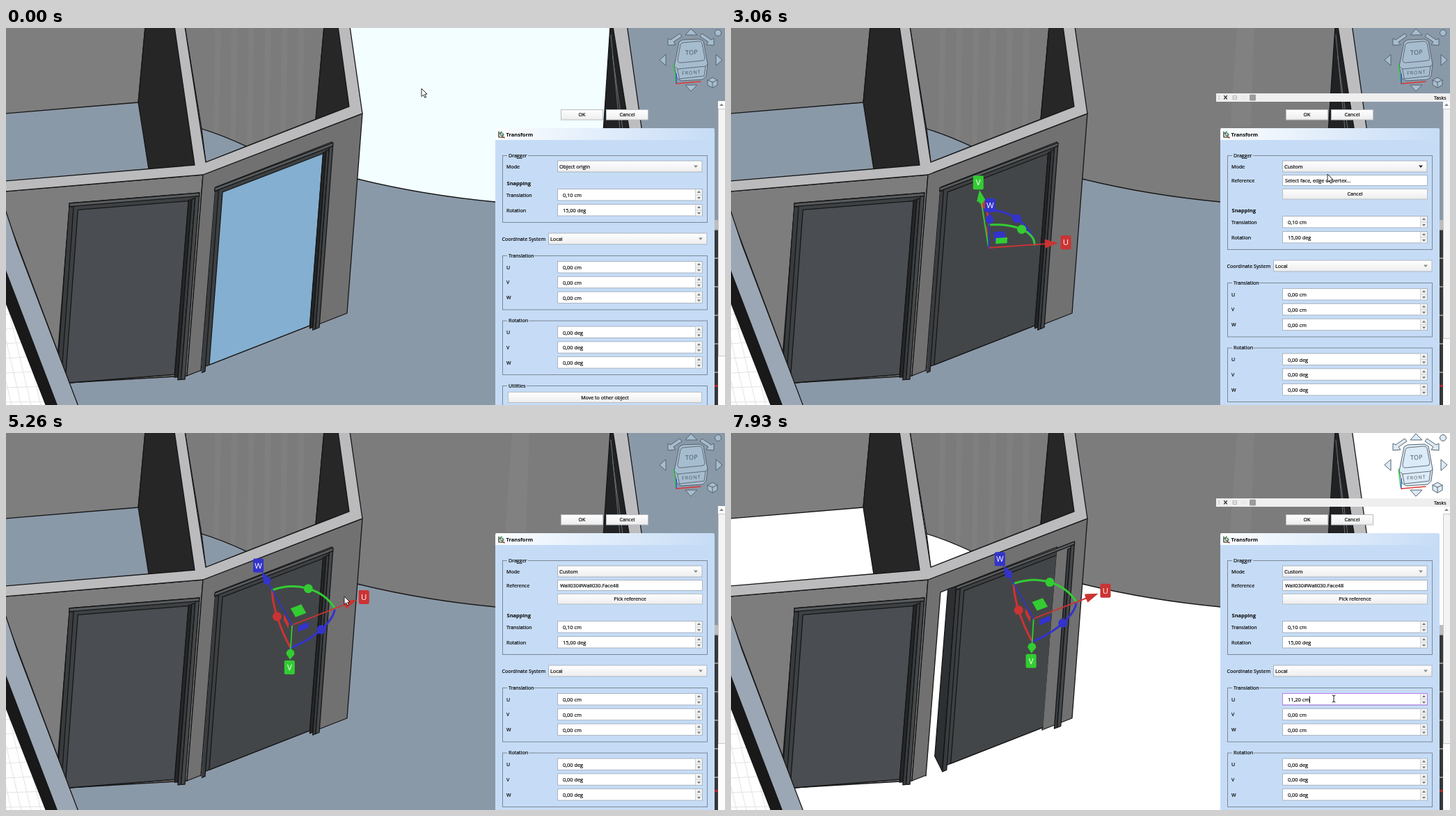
Recreate the animation shown at these times as an HTML page. Size 1033 by 542 pixels, loop 8 s.

```html
<!DOCTYPE html>
<html lang="en">
<head>
<meta charset="utf-8">
<title>Transform dragger</title>
<style>
html, body { margin: 0; width: 100%; height: 100%; overflow: hidden; background: #fff; }
svg { display: block; width: 1033px; height: 542px; }
text { font-family: "Open Sans", "Noto Sans", sans-serif; fill: #000; white-space: pre; }
.ui { stroke: #000; stroke-width: .18; }
.edge { stroke: #161616; stroke-width: 1.3; stroke-linejoin: round; stroke-linecap: round; }
</style>
</head>
<body>
<svg id="stage" viewBox="0 0 1033 542" xmlns="http://www.w3.org/2000/svg"></svg>
<script>
const LOOP = 8000;
const stage = document.getElementById('stage');

// ---- drawing helpers ----
const poly = (pts, fill, more = 'class="edge"') => `<polygon points="${pts}" fill="${fill}" ${more}/>`;
const flat = (pts, fill) => poly(pts, fill, '');
const path = (d, color, w = 1.3) => `<path d="${d}" fill="none" stroke="${color}" stroke-width="${w}" stroke-linecap="round"/>`;
const edge = d => path(d, '#161616');
const rect = (x, y, w, h, fill, more = '') =>
  `<rect x="${x}" y="${y}" width="${w}" height="${h}" fill="${fill}" ${more}/>`;
const dot = ([x, y], fill, r = 6.5) => `<circle cx="${x}" cy="${y}" r="${r}" fill="${fill}"/>`;
const text = (x, y, s, size = 7.1, more = 'class="ui"') =>
  `<text x="${x}" y="${y + size * 0.36}" font-size="${size}" ${more}>${s}</text>`;
const centred = (x, y, s, size = 7.1, more = 'class="ui"') => text(x, y, s, size, 'text-anchor="middle" ' + more);
const group = (id, body) => `<g id="${id}">${body}</g>`;
const clipped = (id, body) => `<g clip-path="url(#${id})">${body}</g>`;
const repeat = (n, fn) => Array.from({ length: n }, (_, i) => fn(i)).join('');
const mix = (a, b, f) => a.map((v, i) => v + (b[i] - v) * f);

// ---- building ----
const FLOOR = 'var(--floor)';
const CORNER = '283,211', TIP = '512,123', INNER = '287,193';

const grid = () => repeat(8, i =>
  path(`M0 ${412 + i * 21}l60 ${i - 7}M${i * 14 - 42} 390l36 152`, '#e2e2e2', 1));

const streaks = () => repeat(6, i =>
  flat([300, 309, 305, 298].map((x, k) => `${x + i * 24},${k < 2 ? 0 : 190}`), 'rgba(255,255,255,.03)'));

function rooms() {
  return rect(0, 0, 1033, 542, FLOOR)
    // curved wall and the post at its end
    + `<path d="M480 -2H869L857 262Q780 260 703 250Q598 240 505 217L470 150Z" fill="var(--back)" class="edge"/>`
    + poly('727,0 752,0 747,142 717,142', '#989898', 'opacity="var(--streak)"')
    + poly('868,-2 873,-2 896,150 858,150', '#202224')
    + path('M869 10L882 145M871.5 40L886 145', '#6d7174', 1)
    + poly('872,-2 892.5,-2 914,150 896,150', '#bdbdbf')
    // left room
    + poly('-2,-2 200,-2 190,107 -2,123', '#7e7e7e')
    + poly('200,-2 243,-2 271,198 205,203 190,107', '#262626')
    // middle room
    + `<path d="M257 -2H457L445 131L345 170Q308 153 281 145Z" fill="#7b7b7b" class="edge"/>` + clipped('mid', streaks())
    + `<path d="M281 145Q308 153 345 170L${INNER}Z" fill="${FLOOR}" class="edge"/>`
    + poly('457,-2 478,-2 493,113 445,131', '#272727');
}

const fronts = () =>
  poly(`-2,235 ${CORNER} 260,500 91,510 -2,262`, '#7d7d7d')
  + poly(`${CORNER} ${TIP} 490,410 260,500`, 'var(--front)')
  + poly(`-2,220 271,197 242,-2 257,-2 ${INNER} 493,113 477,-2 494,-2 ${TIP} ${CORNER} -2,235`, '#bbbbbd');

const sideWall = () =>
  flat('0,392 0,542 62,542', '#fff') + clipped('yard', grid())
  + poly('-2,345 -2,390 58,544 77,544', '#191919')
  + poly('-2,258 16,312 104,544 74,544 -2,345', '#9ba7b4');

// A door is laid out in unit coordinates over its four corners.
function door([tl, tr, br, bl], pane) {
  const at = (u, v, drop = 0) => {
    const [x, y] = mix(mix(tl, tr, u), mix(bl, br, u), v);
    return [x, y + drop];
  };
  const part = (u0, u1, v0, v1, fill, drop) =>
    poly([at(u0, v0), at(u1, v0), at(u1, v1, drop), at(u0, v1, drop)].join(' '), fill);
  const side = [tl, [tl[0] - 12, tl[1] + 3], [bl[0] - 11, bl[1] - 15], at(0, 1, 7)].join(' ');
  return {
    inner: poly(side, '#2d3033') + part(0, 1, 0, 1, '#3e4143') + part(0, .035, .02, 1, '#393c3f', 7)
      + part(.07, .92, .04, 1, pane) + part(.92, .945, .035, 1, '#242628', 4),
    outer: part(0, 1, 0, .018, '#575b5e') + part(.945, .97, .03, 1, '#393c3f', 8) + part(.97, 1, .018, 1, '#45484b', 8)
  };
}

function doors() {
  const left = door([[91, 252], [278, 237], [257, 497], [72, 511.5]], '#4a4d52');
  const right = door([[300, 230], [470, 165], [450, 422.5], [280, 489]], 'var(--pane)');
  return clipped('leftGap', left.inner) + left.outer
    + flat('301,229 468,164 447,429 280,496', FLOOR) + edge('M280 493L301 229L468 164L447 427')
    + clipped('gap', group('doorIn', right.inner)) + group('doorOut', right.outer);
}

// ---- dragger: three projected axes, arcs and planes between them ----
const RED = '#cc3333', GREEN = '#33cc33', BLUE = '#3333cc';

function dragger(o, u, v, w) {
  const ARC = .66;
  const sum = (a, p, b, q) => o.map((c, i) => c + a[i] * p + b[i] * q);
  const along = (a, f) => sum(a, f, a, 0);
  const onArc = (a, b, f) => sum(a, ARC * Math.cos(f * Math.PI / 2), b, ARC * Math.sin(f * Math.PI / 2));
  const arc = (a, b, color) =>
    path('M' + Array.from({ length: 17 }, (_, i) => onArc(a, b, i / 16)).join('L'), color, 3) + dot(onArc(a, b, .5), color);
  const plane = (a, b, color) =>
    flat([[.1, .1], [.265, .1], [.265, .265], [.1, .265]].map(([p, q]) => sum(a, p, b, q)).join(' '), color);
  const axis = (a, name, color) => {
    const size = Math.hypot(...a), [nx, ny] = [-a[1] / size * 6.5, a[0] / size * 6.5];
    const base = along(a, .81), [x, y] = along(a, 1 + 11 / size);
    return path(`M${o}L${base}`, color, 1.8)
      + flat([along(a, 1), [base[0] + nx, base[1] + ny], [base[0] - nx, base[1] - ny]].join(' '), color)
      + dot(base, color, 6.5 * Math.sqrt(Math.max(0, 1 - (size / 102) ** 2)))
      + rect(x - 7.5, y - 10, 15, 20, color, 'rx="2"') + centred(x, y, name, 11.5, 'style="fill:#fff"');
  };
  return plane(v, w, RED) + plane(u, v, BLUE) + plane(u, w, GREEN)
    + arc(v, w, RED) + arc(u, v, BLUE) + arc(u, w, GREEN)
    + axis(v, 'V', GREEN) + axis(u, 'U', 'var(--u)') + axis(w, 'W', BLUE);
}

const FACE_U = [93, -36];
const draggers = () =>
  group('dragCentre', dragger([370, 316], [100, -7], [-13, -83], [2, -50]))
  + group('dragFace', dragger([411, 276], FACE_U, [-3, 50], [-43, -76]));

// ---- navigation cube ----
function navCube() {
  const skin = 'stroke="#57626c" stroke-width="1" stroke-linejoin="round"';
  const shape = (pts, more = '') => poly(pts, 'rgba(190,218,240,.55)', skin + more);
  const label = (y, s, size, gap) => centred(985, y, s, size,
    `transform="rotate(-4 985 ${y})" letter-spacing="${gap}" style="fill:#46525d"`);
  const bend = '951,25 951,15 955,17 968,8 971,12 959,20 962,24';
  return shape('984,1 993,10 976,10') + shape('984,91 993,82 976,82')
    + shape('939,46 948,38 948,54') + shape('1029,46 1020,38 1020,54')
    + shape(bend) + shape(bend, ' transform="matrix(-1 0 0 1 1968 0)"')
    + `<circle cx="1023" cy="7" r="4.5" fill="rgba(190,218,240,.55)" ${skin}/>`
    + shape('967,20 972,17 996,16 1002,19 1008,52 1006,69 1001,74 970,76 964,72 960,55')
    + path('M969 24Q970 21 973 21L995 19Q999 19 1000 22L1004 43Q1004 47 1000 47L969 50Q965 50 965 46Z', '#57626c', .9)
    + path('M965 59L1005 55L1003 69L968 73ZM960 55L965 59M1008 52L1005 55', '#57626c', .9)
    + label(35, 'TOP', 9, .2) + label(64, 'FRONT', 6.8, 1.2)
    + path('M959 52L962 78', '#2fd048') + path('M963 66V80', '#3344dd') + path('M963 80L998 77', '#dd3535')
    + shape('1008,75 1015,71 1022,75 1022,82 1015,86 1008,82') + path('M1008 75L1015 78L1022 75M1015 78V86', '#57626c', 1);
}

// ---- task panel ----
const BODY = '#c6dcf6', BUTTON = 'url(#btn)';
const frame = (x, y, w, h, fill = '#fff', color = '#a9b4c0') =>
  rect(x + .5, y + .5, w - 1, h - 1, fill, `stroke="${color}"`);
const caret = (x, y, fill) => flat(`${x - 3},${y - 1.5} ${x + 3},${y - 1.5} ${x},${y + 2}`, fill);
const button = (x, y, w, h, s, more) => frame(x, y, w, h, BUTTON, '#b8bec4') + centred(x + w / 2, y + h / 2, s, 7.1, more);

const spin = (y, label, value, id = '') =>
  text(719, y, label) + frame(792, y - 9, 209, 17.5)
  + rect(991, y - 8, 9, 15.5, '#f1f1f1') + path(`M990.5 ${y - 8}v15.5M991 ${y}h9`, '#c4cad0', .8)
  + flat(`993,${y - 3} 998,${y - 3} 995.5,${y - 6}`, '#777') + flat(`993,${y + 3} 998,${y + 3} 995.5,${y + 6}`, '#777')
  + text(800, y + .5, value, 7.4, `class="ui" id="${id}"`);

const box = (y, h, s, gap, id = '') =>
  rect(713.5, y + .5, 294, h, 'none', `stroke="#7c8894" id="${id}"`) + rect(720, y - 2, gap, 5, BODY) + text(722, y, s);

const axes = (y, unit) =>
  ['U', 'V', 'W'].map((s, i) => spin(y + i * 21.8, s, '0,00 ' + unit, s + unit)).join('');

function panel() {
  const bold = 'font-weight="700"';
  const bar = rect(697, 94, 336, 12, '#efefef') + path('M701 97V103', '#bbb', 1)
    + path('M708.5 97.5l4 4.500M712.5 97.5l-4 4.500', '#333', 1.2)
    + path('M721.5 97.5h5v5h-5zM721.5 100h5', '#aaa', .8) + path('M734 98h5v4h-5z', '#dcdcdc', .8)
    + rect(745, 95.5, 9, 9, '#9b9b9b', 'rx="1.5"') + text(1010, 100, 'Tasks', 7);
  const reference = text(719, 219, 'Reference') + frame(792, 211, 209, 16)
    + text(796, 219.5, '', 7.3, 'class="ui" id="refText"') + button(792, 231, 209, 15.5, '', 'class="ui" id="refButton"');
  const lower = text(719.5, 223, 'Snapping', 7.5, bold)
    + spin(240, 'Translation', '0,10 cm') + spin(262, 'Rotation', '15,00 deg')
    + text(712.5, 303, 'Coordinate System') + frame(779, 294.5, 228.5, 17, BUTTON)
    + text(782, 303.5, 'Local', 7.3) + caret(998, 303, '#8a8a8a')
    + box(327, 77.5, 'Translation', 39) + axes(344, 'cm')
    + group('focus', rect(792.5, 335.5, 208, 16.5, 'none', 'stroke="#b77be8"'))
    + group('blink', path('M831.5 340V349', '#222', 1))
    + box(420.5, 77.5, 'Rotation', 31) + axes(437.5, 'deg')
    + box(514, 60, 'Utilities', 28) + button(721, 523, 279, 16, 'Move to other object');
  return rect(1018, 276, 6, 14, '#bdbdbf') + rect(1018, 290, 6, 252, '#34373a')
    + repeat(6, i => path(`M1018 ${290 + i * 41}h6`, '#aaa')) + rect(1018, 513, 6, 3, '#b02a2a')
    + rect(1023, 105, 10, 437, '#fdfdfd') + flat('1025,112 1031,112 1028,108.5', '#888')
    + rect(1023.5, 116.5, 11, 355, '#f4f4f4', 'id="thumb" stroke="#c8c8c8"')
    + group('bar', bar)
    + button(797, 117, 61, 15.5, 'OK') + button(862, 117, 61, 15.5, 'Cancel')
    + rect(703, 160, 315, 400, BODY) + `<path d="M703 161V146q0-2 2-2h311q2 0 2 2v15z" fill="url(#head)"/>`
    + path('M708 149V157H716', '#222', 1.2) + path('M709 152l3-3M712 157l3-4', '#2b9a3a', 1.5)
    + rect(710.5, 151, 3.5, 3.5, '#c9d4dc', 'stroke="#444" stroke-width=".7"') + path('M713 156l3 2', '#c33')
    + text(718.5, 153, 'Transform', 7.5, bold)
    + box(183, 96, 'Dragger', 30, 'dragBox')
    + text(719, 199, 'Mode') + frame(792, 190.5, 208.5, 17, BUTTON)
    + text(795, 199.5, '', 7.4, 'class="ui" id="modeText"') + group('modeArrow', caret(991, 199, 'currentColor'))
    + group('reference', reference) + group('lower', lower);
}

const MODES = ['Object origin', 'Center of mass / Centroid', 'Custom'], ROW = 14.3;

const popup = () =>
  rect(795, 194, 208, 43, '#000', 'opacity=".22"') + frame(792.5, 190.5, 208.5, 44.5, '#f1f1f1', '#a0a0a0')
  + rect(793.5, 191.5, 206.5, 14, '#42a2ff', 'id="pick"')
  + MODES.map((s, i) => text(812.5, 198.5 + i * ROW, s, 7.65)).join('')
  + group('tick', path('M799.5 198L801 200L804 195.5', '#222', 1.1));

const OUTLINE = 'stroke="#111" stroke-width=".9"';
const pointers = () =>
  group('arrow', poly('0,0 0,11.5 2.7,9 4.7,13.2 6.6,12.3 4.7,8.3 8,8', '#fff', OUTLINE))
  + group('hand', `<path d="M-1 1Q0-1 1 1V6L5 7Q7 7.500 7 9L6 14.500H0L-4 9Q-3.500 7-1 9Z" fill="#fff" ${OUTLINE}/>`)
  + group('beam', path('M-2-5Q0-5 0-3.500Q0-5 2-5M0-4V4M-2 5Q0 5 0 3.500Q0 5 2 5', '#222', 1));

const CLIPS = {
  yard: '0,390 58,542 0,542',
  mid: '257,0 457,0 445,131 345,169 281,144',
  gap: '301,228 468,163 447,442 280,508',
  leftGap: '91,250 279,236 256,512 70,514'
};

stage.innerHTML = `<defs>
  <linearGradient id="btn" x2="0" y2="1"><stop stop-color="#fff"/><stop offset="1" stop-color="#ededed"/></linearGradient>
  <linearGradient id="head"><stop stop-color="#fbfdff"/><stop offset="1" stop-color="${BODY}"/></linearGradient>
  ${Object.entries(CLIPS).map(([id, pts]) => `<clipPath id="${id}"><polygon points="${pts}"/></clipPath>`).join('')}
</defs>` + rooms() + fronts() + doors() + sideWall() + draggers()
  + navCube() + panel() + group('popup', popup()) + group('pointer', pointers());

// ---- timeline ----
const $ = id => document.getElementById(id);
const show = (id, on) => { $(id).style.display = on ? '' : 'none'; };
const move = (id, x, y) => $(id).setAttribute('transform', `translate(${x} ${y})`);
const within = (t, a, b) => t >= a && t < b;
const progress = (t, a, b) => Math.min(1, Math.max(0, (t - a) / (b - a)));
const setVar = (name, value) => stage.style.setProperty(name, value);

// pointer moves: start, end, place reached
const MOVES = [
  [60, 530, 900, 198], [1060, 1200, 918, 209], [1660, 2060, 857, 199], [2660, 2860, 857, 210], [3060, 3860, 481, 238],
  [4130, 4200, 486, 235], [5260, 5660, 491, 245], [6000, 6600, 515, 245], [7000, 7800, 866, 382]
];
const pointerAt = t => MOVES.reduce((p, [a, b, ...to]) => mix(p, to, progress(t, a, b)), [597, 87]);

// The surface under the pointer lights up; the last one stays lit once the panel is entered.
function litSurface(t, [x, y]) {
  if (within(t, 5260, 7060)) return '';
  if (x > 703) return t > 7000 ? 'floor' : '';
  if (x < 504) return 'front';
  return y < 217 + (x - 505) * .17 ? 'back' : 'floor';
}

function draw(t) {
  const pointer = pointerAt(t), lit = litSurface(t, pointer);
  setVar('--floor', lit === 'floor' ? '#ffffff' : '#8a99a8');
  setVar('--back', lit === 'back' ? '#f2feff' : '#7c7c7c');
  setVar('--streak', lit === 'back' ? 0 : .18);
  setVar('--front', lit === 'front' ? '#e3ffff' : '#717171');
  setVar('--pane', t < 1400 ? '#84afd0' : '#434648');
  setVar('--u', within(t, 5860, 7000) ? '#ffff00' : RED);

  const u = t < 6000 ? 0 : .3 + 10.9 * progress(t, 6000, 6600);
  const shift = FACE_U.map(c => c * u * .0228);
  ['doorIn', 'doorOut', 'dragFace'].forEach(id => move(id, ...shift));
  show('dragCentre', within(t, 1400, 4200));
  show('dragFace', t >= 4200);

  const custom = t >= 3060, picked = t >= 4530;
  const mode = t < 1400 ? 0 : custom ? 2 : 1;
  $('modeText').textContent = MODES[mode];
  $('modeArrow').style.color = within(t, 2330, 4530) ? '#222' : '#8a8a8a';
  $('refText').textContent = picked ? 'Wall030#Wall030.Face48' : 'Select face, edge or vertex...';
  $('refButton').textContent = picked ? 'Pick reference' : 'Cancel';
  $('Ucm').textContent = u.toFixed(1).replace('.', ',') + '0 cm';
  show('reference', custom);
  move('lower', 0, custom ? 39 : 0);
  $('dragBox').setAttribute('height', custom ? 135 : 96);
  $('thumb').setAttribute('height', custom ? 330 : 355);
  show('bar', within(t, 330, 4860) || t >= 7460);
  show('focus', t >= 7860);
  show('blink', t >= 7930);

  show('popup', within(t, 730, 1400) || within(t, 2330, 3060));
  move('popup', 0, mode * -ROW);
  move('tick', 0, mode * ROW);
  move('pick', 0, (t < 1130 ? 0 : t < 2800 ? 1 : 2) * ROW);

  const hand = within(t, 5660, 7000), beam = t >= 7790;
  show('hand', hand);
  show('beam', beam);
  show('arrow', !hand && !beam);
  move('pointer', ...pointer);
}

function tick() {
  const step = Math.floor((performance.now() % LOOP + 7) * 15 / 1000) % 120;
  draw(Math.floor(step * 20 / 3) * 10);
  requestAnimationFrame(tick);
}
tick();
</script>
</body>
</html>
```
